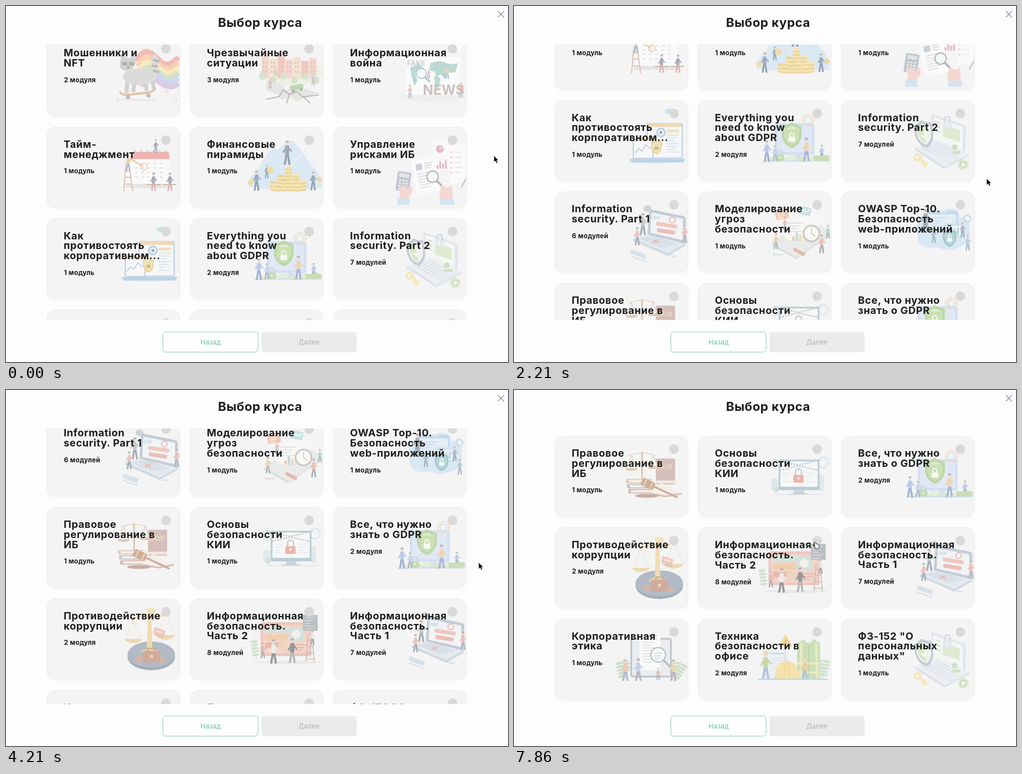
An HTML page that plays this animation: 888x630 px, repeating every 8 s.

```html
<!DOCTYPE html>
<html lang="ru">
<head>
<meta charset="utf-8">
<title>Выбор курса</title>
<style>
  html, body { margin: 0; width: 100%; height: 100%; overflow: hidden; background: #fdfdfd; }
  svg { display: block; width: 888px; height: 630px; font-family: Inter, "Open Sans", sans-serif; }
  .heading { font-size: 22px; font-weight: 700; letter-spacing: .02em; fill: #1d1d1d; }
  .title { font-size: 18px; font-weight: 700; letter-spacing: .03em; fill: #1d1d1d; }
  .count { font-size: 11.7px; font-weight: 700; letter-spacing: .02em; fill: #1d1d1d; }
  .button { font-size: 11.7px; letter-spacing: .02em; }
</style>
</head>
<body>
<svg viewBox="0 0 888 630">
  <defs>
    <clipPath id="view"><rect x="60" y="68" width="790" height="487.5"/></clipPath>
    <clipPath id="panel"><rect x="2.5" y=".5" width="233.5" height="141.5" rx="14"/></clipPath>
  </defs>
  <rect width="888" height="630" fill="#fdfdfd"/>
  <g clip-path="url(#view)"><g id="list"></g></g>
  <text class="heading" x="449.5" y="36.500" text-anchor="middle">Выбор курса</text>
  <path d="M870 9l11 11M881 9l-11 11" stroke="#8296ab" stroke-width="1.4"/>
  <rect x="277.5" y="577" width="168.5" height="35.5" rx="5" fill="#fefefe" stroke="#86d3bd"/>
  <text class="button" x="362" y="599" text-anchor="middle" fill="#5fc2a4">Назад</text>
  <rect x="452" y="577" width="168.5" height="36" rx="5" fill="#ebebeb"/>
  <text class="button" x="536" y="599" text-anchor="middle" fill="#b1b1b1">Далее</text>
  <g id="cursor">
    <path id="arrow" d="M0 0V12.2L2.8 9.7L4.7 14L6.9 13L5 8.9H8.6Z" fill="#000" stroke="#fff" stroke-width=".9"/>
    <path id="hand" d="M-2-4.500Q-.7-6 .3-4.500L1.500-1.500Q2.700-2.300 3.500-1Q4.700-1.700 5.300-.3Q6.800-.6 6.800 1V3.500L5.600 7H.2L-3-2.500V2.600Q-4 1-2.500 1.200L-1 2.500Z" fill="#fff" stroke="#222" stroke-linejoin="round"/>
  </g>
</svg>
<script>
// Drawing helpers; every picture uses coordinates relative to its card.
const rect = (x, y, w, h, fill, r = 0, more = '') => `<rect x="${x}" y="${y}" width="${w}" height="${h}" rx="${r}" fill="${fill}" ${more}/>`;
const oval = (x, y, rx, ry, fill) => `<ellipse cx="${x}" cy="${y}" rx="${rx}" ry="${ry}" fill="${fill}"/>`;
const dot = (x, y, r, fill) => oval(x, y, r, r, fill);
const ring = (x, y, r, color, w = 2, fill = 'none') => `<circle cx="${x}" cy="${y}" r="${r}" fill="${fill}" stroke="${color}" stroke-width="${w}"/>`;
const shape = (d, fill) => `<path d="${d}" fill="${fill}"/>`;
const line = (d, color, w = 1) => `<path d="${d}" fill="none" stroke="${color}" stroke-width="${w}" stroke-linejoin="round"/>`;
const word = (x, y, size, color, text) => `<text x="${x}" y="${y}" font-size="${size}" font-weight="700" fill="${color}">${text}</text>`;
const move = (x, y, turn, body) => `<g transform="translate(${x} ${y}) rotate(${turn})">${body}</g>`;
const repeat = (n, make) => Array.from({ length: n }, (_, i) => make(i)).join('');
const dashed = body => `<g stroke-dasharray="3 2">${body}</g>`;

// A standing figure: (x, y) is the point between the feet.
const person = (x, y, h, top, legs) => move(x, y, 0,
  line(`M-1 ${-h * .45}L${-h * .1} 0M1 ${-h * .45}L${h * .1} 0`, legs, h * .085) +
  line(`M0 ${-h * .76}L${h * .19} ${-h * .55}M0 ${-h * .76}L${-h * .17} ${-h * .5}`, top, h * .065) +
  rect(-h * .085, -h * .8, h * .17, h * .38, top, 2) +
  dot(0, -h * .9, h * .075, '#efd3c6') + oval(0, -h * .95, h * .075, h * .045, '#a5a0a0'));
const shield = (x, y, w, h, outer, inner) => {
  const outline = (a, b) => `M0 ${-b / 2}Q${a * .25} ${-b * .38} ${a / 2} ${-b * .36}V0Q${a * .45} ${b * .36} 0 ${b / 2}Q${-a * .45} ${b * .36} ${-a / 2} 0V${-b * .36}Q${-a * .25} ${-b * .38} 0 ${-b / 2}`;
  return move(x, y, 0, shape(outline(w, h), outer) + shape(outline(w * .78, h * .78), inner));
};
const lock = (x, y, s, body, bow = '#c3c9cc') =>
  line(`M${x - s * .3} ${y}V${y - s * .4}A${s * .3} ${s * .3} 0 0 1 ${x + s * .3} ${y - s * .4}V${y}`, bow, s * .16) +
  rect(x - s / 2, y - s * .1, s, s * .75, body, 1.5) + dot(x, y + s * .22, s * .11, '#fff');
const lens = (x, y, r, color) => line(`M${x + r * .7} ${y + r * .7}l${r} ${r}`, color, 3.5) + ring(x, y, r, color, 2, '#f4fafacc');
const bars = (x, y, w, n, color, gap = 5) => repeat(n, i => rect(x, y + i * gap, w * (1 - i % 3 * .2), 1.6, color));
const coins = (x, y, n) => repeat(n, i => oval(x, y - i * 3, 6.5, 2.6, i % 2 ? '#f6e2a2' : '#e8ca7d'));
const leaf = (x, y, turn, color) => move(x, y, turn, repeat(5, i =>
  oval(-3, -8 - i * 6, 3.6, 2, color) + oval(3, -8 - i * 6, 3.6, 2, color)) + line('M0 0V-38', color, 1.3));

const art = {
  raccoon: () => ['#f1aaa2', '#f7c6a1', '#f8e6ad', '#c5dfbd', '#bfcff0', '#d2bfe0'].map((c, i) =>
      line(`M${161 + i * 2} ${46 + i * 9}C${173 + i} ${14 + i * 10} ${190 + i} ${34 + i * 9} ${202 + i} ${46 + i * 8}S225 ${47 + i * 9} 234 ${39 + i * 9}`, c, 10)).join('') +
    line('M186 74C202 66 183 48 196 36', '#d4d4d0', 11) + line('M189 62l11 3M187 53l11 2M189 43l11 3', '#a8a9a5', 4) +
    line('M144 78l-2 24M156 84l-2 16M176 82l2 16M187 76l4 20', '#c5c6c1', 7) + oval(165, 73, 29, 15, '#d3d4d0') +
    shape('M131 46l2-13 8 6h9l7-6 2 15-7 11-11 4-10-5Z', '#c9cac6') + oval(139, 50, 5, 3.5, '#9a9b99') + oval(151, 50, 5, 3.5, '#9a9b99') + dot(145, 56, 2, '#888') +
    line('M130 100q6 6 14 5l36-4q9-1 13-7', '#d8b493', 4) + dot(145, 110, 4, '#c4a9a0') + dot(181, 106, 4, '#c4a9a0') +
    oval(163, 114, 34, 2, '#e6e6e6') + ring(227, 115, 4, '#d5d5d5', 1) + line('M213 93v12m-6-6h12M126 112v6m-3-3h6', '#d5d5d5'),

  disaster: () => oval(180, 65, 56, 24, '#eaf0e2') + repeat(7, i =>
      rect(128 + i * 14, 34 + i * 7 % 12, 13, 42 - i * 7 % 12, ['#f3cec2', '#f0dfc5', '#efbdb2'][i % 3]) +
      repeat(6, k => rect(130 + i * 14 + k % 2 * 5, 46 + (k >> 1) * 8, 3, 4, '#e0b8b0'))) +
    repeat(6, i => dot(129 + i * 19, 72 + i % 2 * 7, 6, '#c9dfbf')) +
    shape('M136 79l28 8 8 10 16-8 42 13-22 5-18 11-8-9-20 5-4-10-22-7Z', '#e3e0db') +
    line('M136 113l23-5 7-12 11 8 14-5 9 10 29-4M177 104l-5 16M200 107l14 13', '#aaa7a3', 2) +
    move(190, 92, -12, rect(-12, -5, 24, 9, '#a9cf9a', 3) + dot(-7, 5, 2.5, '#999') + dot(7, 5, 2.5, '#999')) +
    person(143, 94, 18, '#dfa39b', '#a9a9b2') + person(219, 88, 20, '#a7c6d8', '#b0a9b2') + person(153, 71, 15, '#e9c37d', '#aaa'),

  news: () => oval(176, 109, 58, 8, '#ededed') + rect(130, 37, 96, 68, '#fcfcfc', 2) + rect(213, 17, 15, 11, '#fff') +
    shape('M137 57l15-7 8 7-7 10-7 1 4 12-5 9-5-16Z', '#a8d1c8') + shape('M173 49l16-4 20 6 13-2-5 16-14 1-4 11-9-9-6 8-3-12-9-2Z', '#a8d1c8') + shape('M180 71l11 4-4 20-6-8Z', '#a8d1c8') +
    word(132, 54, 12.5, '#c1c0c0', 'FAKE') + word(160, 105, 24, '#b9b0ae', 'NEWS') + lens(157, 67, 9, '#9dbdca') +
    person(137, 111, 24, '#efaf9d', '#8eb9c2') + person(203, 77, 22, '#f3c69f', '#8eb9c2') + person(227, 110, 26, '#ea9c91', '#a9b3c4') + person(170, 76, 17, '#f0b49f', '#7d9ca8'),

  calendar: () => shape('M151 44h66l4 64h-80Z', '#fbfbfb') + shape('M151 44h66l1 13h-69Z', '#eca09d') + shape('M142 101h79v7h-81Z', '#dfdfe1') +
    repeat(20, i => rect(157 + i % 5 * 11, 64 + (i / 5 | 0) * 8, 5, 1.4, '#d1cdcd')) + ring(173, 70, 6, '#e9bd87', 1.5) +
    repeat(6, i => rect(156 + i * 11, 41, 2, 7, '#c6bcbc')) + line('M141 67l-4 47M147 67l6 47M139 78h10M139 89h11M138 101h13', '#c8aa9b', 1.6) +
    person(145, 77, 27, '#e9c592', '#909cb0') + line('M148 56l24 14', '#e7b377', 2) + person(194, 47, 25, '#8f95a4', '#9598a6') +
    person(190, 113, 32, '#8e95a5', '#db9f9a') + person(219, 113, 32, '#8e95a5', '#db9f9a') + rect(178, 101, 25, 2, '#c4a397') + rect(206, 101, 24, 2, '#c4a397'),

  pyramid: () => shape('M105 106Q106 85 119 76L142 43Q148 34 157 40L174 25Q182 21 189 30L217 68Q233 83 234 108Q170 116 105 106', '#d3e6f4') +
    line('M110 86l35-34 25 28 35-39 27 35', '#e8f1f8', 1.5) +
    repeat(5, i => coins(149 + i * 13, 111, [5, 9, 14, 10, 6][i])) + repeat(4, i => coins(156 + i * 12, 112, [3, 7, 6, 4][i])) +
    person(173, 67, 43, '#87909d', '#7c8796') + person(119, 113, 36, '#8295ad', '#75849a') + person(137, 91, 24, '#7d91aa', '#72849c') + person(219, 112, 33, '#8094ad', '#73839b') +
    dot(143, 76, 6, '#ecd38b') + dot(230, 93, 5, '#ecd38b') + dot(109, 98, 5, '#ecd38b'),

  risk: () => move(175, 24, -3, rect(0, 0, 29, 55, '#fafafa')) + shape('M202 36l34-9v69l-28 5Z', '#fcfcfc') +
    dot(190, 39, 7, '#e7a6ab') + shape('M190 39v-7a7 7 0 0 1 7 7Z', '#c7ccda') + [6, 13, 9, 16].map((h, i) => rect(184 + i * 5, 74 - h, 3, h, '#d7a4ae')).join('') +
    repeat(5, i => line(`M208 ${43 + i * 9}l4 4m0-4l-4 4`, '#e7a6a6') + rect(215, 44 + i * 9, 14, 1.5, '#dedede')) +
    move(138, 60, -11, rect(0, 0, 43, 62, '#fcfcfc') + rect(7, 8, 11, 11, '#bfc4ce') + bars(22, 9, 16, 3, '#cccfd6', 4) + bars(7, 25, 30, 6, '#d5d5da')) +
    move(116, 78, 8, rect(0, 0, 24, 34, '#b3b6bf', 2) + rect(3, 3, 18, 7, '#d9e1e2') + repeat(12, i => rect(4 + i % 3 * 6, 14 + (i / 3 | 0) * 5, 4, 3, '#e8e8ec'))) +
    lens(177, 88, 10, '#9b9da4') + shape('M118 138l1-27 5-9 7 8 9-7 2 11-7 10-2 14Z', '#f4cec4') + shape('M191 138l-2-22 4-13 10 5 8-4 3 34Z', '#f4cec4') +
    rect(115, 126, 21, 12, '#cbdff0') + rect(190, 127, 25, 11, '#cbdff0') + line('M238 88l-10 19', '#b2b2b2', 2),

  monitors: () => oval(178, 108, 48, 4, '#dce8f3') + rect(163, 40, 65, 65, '#bfd1e7', 3) + rect(166, 47, 59, 54, '#f6f8fa') + rect(166, 41, 59, 6, '#efcf9c') +
    rect(139, 66, 37, 38, '#aebfdd', 2) + rect(141, 71, 33, 31, '#f9f9f9') + rect(139, 66, 37, 4, '#efc58d') + line('M143 94l7-9 5 5 7-11 9 7', '#a4bee1', 1.6) +
    bars(199, 61, 22, 7, '#cbdae8') + rect(199, 52, 22, 5, '#f3d7a4') + ring(189, 57, 7, '#a0c3e3', 3, '#fff') + dot(189, 57, 3, '#8299bb') +
    shield(181, 83, 19, 26, '#e9c681', '#f3dfa9') + lock(181, 83, 7, '#bc9c63') + shape('M133 104h100l-5 6h-90Z', '#abc7e2') +
    shape('M196 17l9-3 8 5-7 6-10-2Z', '#b7e4e7'),

  gdpr: () => rect(137, 41, 70, 56, '#c9d8f1', 3) + rect(141, 45, 62, 47, '#dbe5f6', 2) + shape('M162 97h22l6 10h-34Z', '#ccd7ec') +
    dashed(ring(196, 36, 10, '#f3d1a9', 3)) + ring(196, 36, 6, '#c4dced', 2) +
    repeat(6, i => oval(129 + i * 19, 105 - i % 3 * 2, 9, 5, i % 2 ? '#d3e4bd' : '#e0ebd3')) + rect(115, 107, 118, 1.5, '#becfdd') +
    shield(167, 62, 35, 46, '#a9ce8e', '#bedb9f') + word(160, 51, 5, '#f4faec', 'GDPR') + lock(167, 66, 12, '#f7faf2', '#f7faf2') +
    lock(146, 98, 14, '#b4d49a') + person(123, 109, 38, '#a8bde7', '#869bc7') + person(137, 108, 28, '#b9c9eb', '#8ca0cb') +
    person(193, 108, 42, '#eccba4', '#8ca5cf') + person(220, 105, 26, '#a8bde7', '#8398bd') + rect(205, 98, 29, 9, '#bcd6a3', 2),

  security: () => shape('M161 24l55 19q6 2 6 8l-1 45-61-22Z', '#dce1eb') + shape('M164 29l52 18v42l-52-18Z', '#f5f7f5') + shape('M181 43l30 10v21l-30-10Z', '#d8e7c6') +
    line('M169 38l8 3m-8 5l8 3m-8 5l8 3', '#cbdcc1', 2) + shape('M132 84l40-15 56 25-44 24Z', '#eaedf2') + shape('M132 84l52 34v4l-53-34Z', '#d3d9e4') + shape('M184 118l44-24v4l-44 24Z', '#d8dee8') +
    repeat(5, i => line(`M${143 + i * 7} ${83 - i * 2}l37 19`, '#d0d7e3', 1.5)) + line('M184 106l14-7 9 4-14 7Z', '#d0d7e3') +
    move(148, 60, -12, shield(0, 0, 32, 50, '#b9bdcf', '#eef2ea') + shape('M-11-15L0-19V17Q-9 11-10 0Z', '#cfe3b5') + line('M-6 0l5 6 9-14', '#f8faf5', 3)) +
    lock(189, 40, 16, '#e1e5ec', '#c7cdd9') + dot(202, 83, 5, '#c2daaa') + rect(198, 90, 14, 5, '#c2daaa', 2.5) +
    line('M140 103l13 12m-6-5l-4 4m8 0l-4 4', '#f3e4a1', 4) + ring(136, 101, 5, '#f3e4a1', 4) +
    dashed(ring(217, 114, 8, '#c9dcae', 3)) + ring(217, 114, 5, '#c3d8a8', 3),

  alert: () => shape('M168 31l60 12q5 1 5 6l-1 44-67-15Z', '#b4bfcb') + shape('M172 37l56 11v38l-58-13Z', '#f0f3f6') + shape('M140 83l26-7 66 16-31 17Z', '#dfe6ec') + shape('M140 83l61 26 31-17v4l-31 18-61-27Z', '#c6d1dc') +
    repeat(5, i => line(`M${152 + i * 6} ${82 - i}l39 16`, '#c3ceda', 1.5)) + move(181, 53, 9, rect(0, 0, 38, 7, '#f0b9b1', 3) + rect(3, 11, 33, 7, '#eaaca5', 3)) + ring(209, 50, 5, '#e9a49e', 2, '#fff') +
    rect(173, 43, 14, 6, '#cfe1ed') + move(137, 102, 20, rect(0, 0, 29, 8, '#cfdbe6', 2) + line('M3 12h28', '#c5d1dd', 1.5)) +
    line('M175 85l10 6m0-6l-10 6', '#e6aaa3', 2.5) + person(157, 77, 39, '#b5bfc5', '#8e97a3') + person(147, 95, 32, '#e4b6aa', '#8e97a3') + person(231, 91, 32, '#e7b0a6', '#9ca7b4') +
    oval(165, 30, 7, 6, '#c4c9cb') + rect(205, 113, 12, 2, '#ccd6df'),

  desk: () => shape('M132 91l67-49 36 31-60 42Z', '#e6e8e7') + shape('M132 91l43 24v5l-43-24Z', '#d6dada') + shape('M175 115l60-42v5l-60 42Z', '#dce0df') + shape('M140 70l57-36 28 20-57 35Z', '#f9f9f7') +
    move(137, 35, -10, rect(0, 0, 23, 16, '#f0bea6', 2) + bars(4, 4, 15, 3, '#faede4', 4)) + move(182, 25, 12, rect(0, 0, 21, 15, '#bbdfdb', 2) + line('M3 11l5-5 5 3 5-6', '#f8fbfb', 2)) +
    bars(160, 55, 28, 4, '#d0d9da') + [8, 15, 11].map((h, i) => rect(168 + i * 6, 87 - h, 4, h, ['#ecbc9d', '#aed2cd', '#edd5a8'][i])).join('') +
    ring(202, 74, 14, '#bab9b4', 3, '#fbfaf6') + line('M202 74V64M202 74l7 5', '#b0aaa5', 1.3) + move(172, 99, 28, rect(0, 0, 22, 6, '#dda494', 1)) +
    person(139, 102, 29, '#e8cb98', '#98a5a5') + person(155, 68, 22, '#e7ad9b', '#96a2a3') + person(220, 109, 33, '#e6b3a0', '#8f9b9f') + person(231, 83, 24, '#a9cbc7', '#8f9b9f') + rect(133, 110, 19, 3, '#d8dedb'),

  web: () => shape('M135 64Q132 44 151 44Q157 28 176 35Q205 22 211 44Q229 45 228 65Q233 91 211 98Q190 108 173 99Q143 104 137 87Z', '#d2e5f3') +
    rect(151, 34, 56, 37, '#b7d1e7', 3) + rect(154, 40, 50, 28, '#e0ecf5') + bars(158, 46, 28, 4, '#b8d3e8') + word(177, 38, 5, '#f4f8fb', 'CSS') +
    rect(183, 56, 33, 26, '#c5ddec', 2) + rect(186, 61, 27, 17, '#eef5f9') + repeat(4, i => rect(188 + i * 6, 69 - i * 2, 3, 7 + i * 2, '#9ec5df')) +
    line('M145 72l4-36m7 36l-3-36m-6 10h7m-7 10h8m-8 9h9', '#b1bbc5', 1.3) + shield(193, 82, 24, 32, '#8bb7bd', '#a3cbcd') + lock(193, 83, 9, '#f4f8f7', '#f4f8f7') +
    person(150, 72, 41, '#8d98a5', '#84909e') + person(216, 81, 26, '#95a7b8', '#7e90a3') + person(225, 104, 27, '#a5bed6', '#8a9caf') + person(165, 91, 27, '#96b3ce', '#8898a9') +
    ring(224, 48, 6, '#c2d7e6', 3),

  law: () => rect(180, 40, 34, 46, '#cdaea7', 2) + rect(180, 79, 34, 5, '#efe6da') + word(180, 60, 13, '#e2cdbb', 'LAW') +
    rect(154, 28, 3, 56, '#d8bc9b') + line('M132 35q23-9 47 0M137 35l-10 23h20l-10-23M175 35l-9 20h18l-9-20', '#d8c0a5', 1.2) + oval(137, 59, 10, 2.5, '#d8bc9b') + oval(175, 56, 9, 2.5, '#d8bc9b') +
    repeat(3, i => rect(127 + i * 2, 76 + i * 9, 47, 8, ['#dfc0b1', '#b9babd', '#d0aaa1'][i], 2) + rect(132 + i * 2, 78 + i * 9, 42, 4, '#f3eee6')) +
    shape('M171 90l20-6 35 18-28 5-25-4Z', '#f4eee4') + line('M173 103l25 4 28-5', '#c8b2a6', 3) + oval(164, 106, 21, 3.5, '#b9978a') +
    move(166, 85, 25, rect(-12, -7, 24, 14, '#bf9781', 3) + rect(-7, -8, 3, 16, '#e1c493') + rect(5, -8, 3, 16, '#e1c493') + rect(12, -2, 46, 3.5, '#bf9781', 2)),

  locked: () => dashed(ring(137, 50, 8, '#d6dfe2', 3) + ring(222, 47, 9, '#cfdae0', 3)) + rect(131, 76, 13, 20, '#d8e5e9', 2) + rect(214, 69, 10, 29, '#dce5e8', 2) +
    rect(144, 42, 72, 54, '#a6c0cb', 3) + rect(147, 45, 66, 45, '#f8f9f9') + shape('M172 96h16l3 7h-22Z', '#bbcbd2') + rect(163, 102, 34, 2, '#a9bcc6', 1) +
    bars(152, 65, 15, 4, '#e1e8eb') + bars(193, 65, 16, 4, '#e1e8eb') +
    dashed(line('M136 42l43 10 41-10M146 61l33-8 35 8', '#b3bec4', 2.5)) +
    lock(179, 71, 18, '#e9a090', '#bec7ca') + dot(139, 95, 5, '#cbd9d4') + rect(135, 103, 93, 1.5, '#d9e1e4'),

  bribe: () => oval(186, 103, 42, 24, '#8a97a7') + oval(186, 99, 42, 23, '#9ca8b6') + shape('M180 30q3-6 6 0l2 62h-10Z', '#f0d39a') + oval(183, 94, 15, 5, '#e5c180') +
    line('M151 40q15-13 31-8t31-8', '#eed49f', 3.5) + line('M153 40l-13 32h28L153 40M212 25l-16 40h32L212 25', '#ecd9b0', 1) +
    shape('M138 72h32q-4 7-16 7t-16-7Z', '#ead09c') + shape('M193 65h36q-6 8-18 8t-18-8Z', '#ead09c') +
    move(192, 51, 18, rect(0, 0, 20, 10, '#efb0a8', 1) + rect(3, 3, 14, 4, '#f6d8d3') + line('M2 12h20', '#d99f99', 2)) +
    rect(171, 93, 31, 20, '#c59382', 4) + line('M180 93v-5h13v5', '#b98c7c', 2) + rect(184, 100, 5, 5, '#ead09c') + dot(165, 107, 6, '#cfa18b') + dot(206, 110, 5, '#cfa18b') + shape('M176 19q12-4 20 1l-6 8h-10Z', '#f6dca6'),

  coding: () => oval(174, 113, 57, 3, '#e6e6e6') + rect(126, 42, 90, 60, '#edb9ab', 3) + rect(130, 47, 82, 50, '#f0cabc') + rect(201, 29, 26, 28, '#a9aeb0', 1) + bars(204, 33, 18, 5, '#ced3d3') +
    repeat(3, i => rect(134, 50 + i * 14, 46 - i * 6, 10, ['#c8dfd8', '#efc399', '#e4a499'][i], 2)) + rect(177, 51, 24, 24, '#c1dfd9', 2) + dot(189, 63, 8, '#f5ece5') + bars(181, 81, 28, 3, '#dda191') +
    line('M206 112l4-48m11 48l-4-48m-7 10h8m-9 11h10m-11 11h13m-14 11h15', '#bdaaa0', 1.6) +
    leaf(119, 108, -8, '#c6dac5') + person(149, 115, 43, '#e9e9e7', '#77777c') + person(182, 114, 44, '#77787e', '#a5a5a8') + person(130, 106, 28, '#dfaaa1', '#929ba6') + person(218, 82, 25, '#e5e3dc', '#8c8d92') +
    rect(157, 79, 16, 10, '#e9cda7', 1),

  ethics: () => [-14, 0, 14].map(a => leaf(122, 110, a, '#bfd9bf')).join('') + [0, 18, 34].map(a => leaf(212, 110, a, '#bfd9bf')).join('') +
    rect(135, 34, 73, 70, '#b0b4bc', 4) + rect(138, 37, 67, 64, '#e7eaef') + rect(151, 26, 37, 65, '#fcfcfc', 2) + bars(156, 36, 27, 9, '#d3d8e0') + rect(158, 29, 23, 3, '#bac9dc') +
    lens(184, 64, 13, '#a6a8ac') + bars(178, 60, 13, 3, '#bfc9d6') + person(126, 110, 38, '#e8bdaa', '#98a8c2') + person(149, 110, 40, '#b6c7e2', '#a5a3ae') +
    person(184, 109, 22, '#e6aaa1', '#91a1bd') + person(211, 110, 38, '#e8d09e', '#a5a3b0'),

  safety: () => rect(113, 55, 49, 52, '#ebf1f5', 2) + word(128, 63, 4.5, '#a7b7c2', 'Regulations') + bars(131, 69, 25, 5, '#d6e0e6') +
    shape('M177 43l11-7q9 14 18 0l11 7v64h-42Z', '#bed8a4') + line('M184 43l-1 64M210 43l2 64', '#e8eab4', 4) + line('M176 79h41M176 95h41', '#e8eab4', 4) + line('M197 46v61', '#a8c492', 1.2) +
    shape('M156 27l12 22h-24Z', '#f4d47d') + word(154, 46, 13, '#b69d69', '!') + line('M156 49v26', '#c1c6c7', 1.5) +
    shape('M137 103q2-28 21-28t23 28l5 4h-53Z', '#f6dc95') + line('M154 76v24m8-24v24', '#ecd08a', 2.5) +
    person(121, 108, 50, '#b7cf8f', '#9eb5d2') + oval(121, 60, 5, 3, '#f3d58c') + person(190, 108, 38, '#edc183', '#9eb5d2') + oval(190, 71, 4, 2.5, '#f3d58c') +
    leaf(222, 107, 12, '#c3dcbd') + leaf(222, 107, -8, '#c3dcbd') + rect(107, 106, 124, 2.5, '#a9d0ec', 1),
};

const courses = [
  ['Мошенники и|NFT', '2 модуля', 'raccoon'], ['Чрезвычайные|ситуации', '3 модуля', 'disaster'], ['Информационная|война', '1 модуль', 'news'],
  ['Тайм-|менеджмент', '1 модуль', 'calendar'], ['Финансовые|пирамиды', '1 модуль', 'pyramid'], ['Управление|рисками ИБ', '1 модуль', 'risk'],
  ['Как|противостоять|корпоративном...', '1 модуль', 'monitors'], ['Everything you|need to know|about GDPR', '2 модуля', 'gdpr'], ['Information|security. Part 2', '7 модулей', 'security'],
  ['Information|security. Part 1', '6 модулей', 'alert'], ['Моделирование|угроз|безопасности', '1 модуль', 'desk'], ['OWASP Top-10.|Безопасность|web-приложений', '1 модуль', 'web'],
  ['Правовое|регулирование в|ИБ', '1 модуль', 'law'], ['Основы|безопасности|КИИ', '1 модуль', 'locked'], ['Все, что нужно|знать о GDPR', '2 модуля', 'gdpr'],
  ['Противодействие|коррупции', '2 модуля', 'bribe'], ['Информационная|безопасность.|Часть 2', '8 модулей', 'coding'], ['Информационная|безопасность.|Часть 1', '7 модулей', 'alert'],
  ['Корпоративная|этика', '1 модуль', 'ethics'], ['Техника|безопасности в|офисе', '2 модуля', 'safety'], ['ФЗ-152 "О|персональных|данных"', '1 модуль', 'security'],
];
const hoveredCourse = 16, lineHeight = 17.7;
const $ = id => document.getElementById(id);

$('list').innerHTML = courses.map(([title, count, picture], i) => {
  const lines = title.split('|');
  const x = 71 + i % 3 * 253.3, y = 52.2 + Math.floor(i / 3) * 161.75;
  return move(x, y, 0,
    rect(0, 0, 238.5, 146.5, '#f7f7f7', 16) + rect(2.5, .5, 233.5, 141.5, '#f4f4f4', 14, 'stroke="#ececec"') +
    `<g id="course${i}"><g opacity=".75" clip-path="url(#panel)">${art[picture]()}</g>` +
    dot(174, 17, .8, '#ddd') + dot(181, 131, 1, '#e6e6e6') + dot(212, 23.5, 8.5, '#d9d9d9') +
    lines.map((text, n) => `<text class="title" x="31" y="${37 + n * lineHeight}">${text}</text>`).join('') +
    `<text class="count" x="31.5" y="${64.8 + (lines.length - 1) * lineHeight}">${count}</text></g>`);
}).join('');

// The picture changes only at these moments.
const ticks = [0, 150, 290, 430, 580, 720, 990, 1250, 1400, 1590, 1780, 1970, 2210, 2500, 2760, 3030, 3240, 3380, 3510, 3640, 3770,
  4210, 4450, 4600, 4750, 4900, 5060, 5210, 5360, 5500, 5650, 5800, 5940, 6950, 7090, 7240, 7390, 7530, 7860];
const scrollTrack = [[0, 0], [720, 47], [1250, 47], [1970, -150], [2210, -209], [2760, -270], [3240, -339], [3770, -440], [4210, -492], [4750, -618]];
const cursorTrack = [[0, 863, 264.5], [720, 840, 292], [1250, 837, 295], [1970, 836, 305], [4750, 836, 305], [5210, 499.5, 280],
  [5940, 528, 270], [6800, 528, 270], [7240, 526, 279], [7530, 532, 270], [7860, 533, 274]];

function sample(track, t) {
  const next = track.findIndex(key => key[0] > t);
  if (next < 0) return track.at(-1).slice(1);
  const a = track[next - 1], b = track[next], p = (t - a[0]) / (b[0] - a[0]);
  return a.slice(1).map((v, i) => v + (b[i + 1] - v) * p);
}

function render(now) {
  const time = now % 8000;
  const t = ticks.findLast(tick => tick <= time);
  const [scroll] = sample(scrollTrack, t), [x, y] = sample(cursorTrack, t);
  const hover = t >= 7860;
  $('list').setAttribute('transform', `translate(0 ${scroll})`);
  $('cursor').setAttribute('transform', `translate(${x} ${y})`);
  $('arrow').style.display = hover ? 'none' : '';
  $('hand').style.display = hover ? '' : 'none';
  $('course' + hoveredCourse).setAttribute('transform', `translate(0 ${hover ? .5 : 0})`);
}

const start = performance.now();
function loop() {
  render(performance.now() - start);
  requestAnimationFrame(loop);
}
loop();
</script>
</body>
</html>
```
